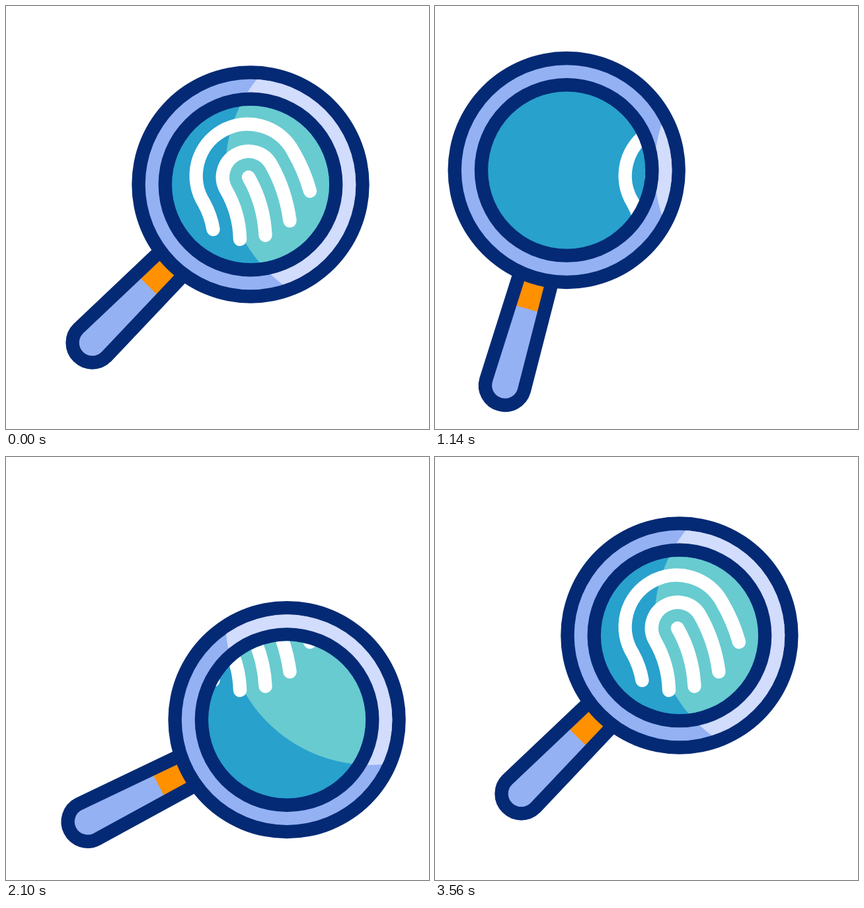
Animation, 640 px wide and 640 px high, one loop 3.6 s. Source, as an HTML page with a canvas:

```html
<!DOCTYPE html>
<html lang="en">
<head>
<meta charset="utf-8">
<title>Magnifier over a fingerprint</title>
<style>
html, body { margin: 0; width: 100%; height: 100%; overflow: hidden; background: #fff; }
canvas { display: block; width: 640px; height: 640px; }
</style>
</head>
<body>
<canvas id="stage" width="640" height="640"></canvas>
<script>
const ctx = document.getElementById('stage').getContext('2d');
const LOOP = 3600;
const NAVY = '#042a75', LAVENDER = '#94b1f3', LIGHT = '#d2dcfc';
const BLUE = '#28a1cd', TEAL = '#68cbd0', ORANGE = '#ff9000';

// time, lens x, lens y, handle angle in degrees
const POSES = [
  [0, 370, 270, 45],
  [270, 319, 255, 36],
  [540, 235, 245, 21.1],
  [780, 200.5, 247, 16.2],
  [960, 193, 247.5, 14],
  [1080, 195, 248, 15],
  [1420, 245, 257, 25],
  [1620, 303, 279, 36.8],
  [2100, 425, 397.5, 62.9],
  [2220, 429, 408, 64.7],
  [2580, 400, 323.3, 52.3],
  [2700, 381, 290, 47],
  [2900, 361, 262, 42.7],
  [3020, 356.5, 258, 41.4],
  [3240, 364.5, 265, 43.6],
  [LOOP, 370, 270, 45]
];

const ridges = new Path2D(
  'M313.5 338Q310 317 299.5 298A78 78 0 1 1 434.5 220Q451 248 460 280' +
  'M354 353Q353 313 333 278.5A39 39 0 1 1 401 239.5Q423 278 429.5 325' +
  'M367 259Q390 299 392.5 347');
const handle = new Path2D('M-25.5 150V175L-30 338.6A30 30 0 0 0 30 338.6L25.5 175V150Z');
const highlight = disc(551, 247, 219);

function disc(x, y, r) {
  const path = new Path2D();
  path.arc(x, y, r, 0, 2 * Math.PI);
  return path;
}

function fill(path, color) {
  ctx.fillStyle = color;
  ctx.fill(path);
}

function stroke(path, color) {
  ctx.strokeStyle = color;
  ctx.lineWidth = 20.4;
  ctx.stroke(path);
}

function clipped(path, draw) {
  ctx.save();
  ctx.clip(path);
  draw();
  ctx.restore();
}

function slope(i, k) {
  return (POSES[i + 1][k] - POSES[i][k]) / (POSES[i + 1][0] - POSES[i][0]);
}

// Smooth tangent through neighbouring poses, flat at turning points
function tangent(i, k) {
  if (i === 0 || i === POSES.length - 1) return 0;
  const a = slope(i - 1, k), b = slope(i, k);
  if (a * b <= 0) return 0;
  const before = POSES[i][0] - POSES[i - 1][0], after = POSES[i + 1][0] - POSES[i][0];
  return (a * after + b * before) / (before + after);
}

function poseAt(time) {
  const i = POSES.findIndex(p => p[0] > time) - 1;
  const span = POSES[i + 1][0] - POSES[i][0];
  const u = (time - POSES[i][0]) / span, v = 1 - u;
  return [1, 2, 3].map(k =>
    POSES[i][k] * v * v * (1 + 2 * u) + POSES[i + 1][k] * u * u * (1 + 2 * v) +
    span * u * v * (tangent(i, k) * v - tangent(i + 1, k) * u));
}

function drawHandle(x, y, angle) {
  ctx.save();
  ctx.translate(x, y);
  ctx.rotate(angle * Math.PI / 180);
  fill(handle, LAVENDER);
  clipped(handle, () => {
    ctx.fillStyle = ORANGE;
    ctx.fillRect(-30, 150, 60, 68);
  });
  stroke(handle, NAVY);
  ctx.restore();
}

function drawLens(x, y) {
  const rim = disc(x, y, 159.3), glass = disc(x, y, 119);
  fill(disc(x, y, 179.7), NAVY);
  fill(rim, LAVENDER);
  clipped(rim, () => fill(highlight, LIGHT));
  fill(disc(x, y, 139.4), NAVY);
  fill(glass, BLUE);
  clipped(glass, () => {
    fill(highlight, TEAL);
    stroke(ridges, '#fff');
  });
}

function frame() {
  const [x, y, angle] = poseAt(performance.now() % LOOP);
  ctx.clearRect(0, 0, 640, 640);
  ctx.lineCap = 'round';
  drawHandle(x, y, angle);
  drawLens(x, y);
  requestAnimationFrame(frame);
}
frame();
</script>
</body>
</html>
```
